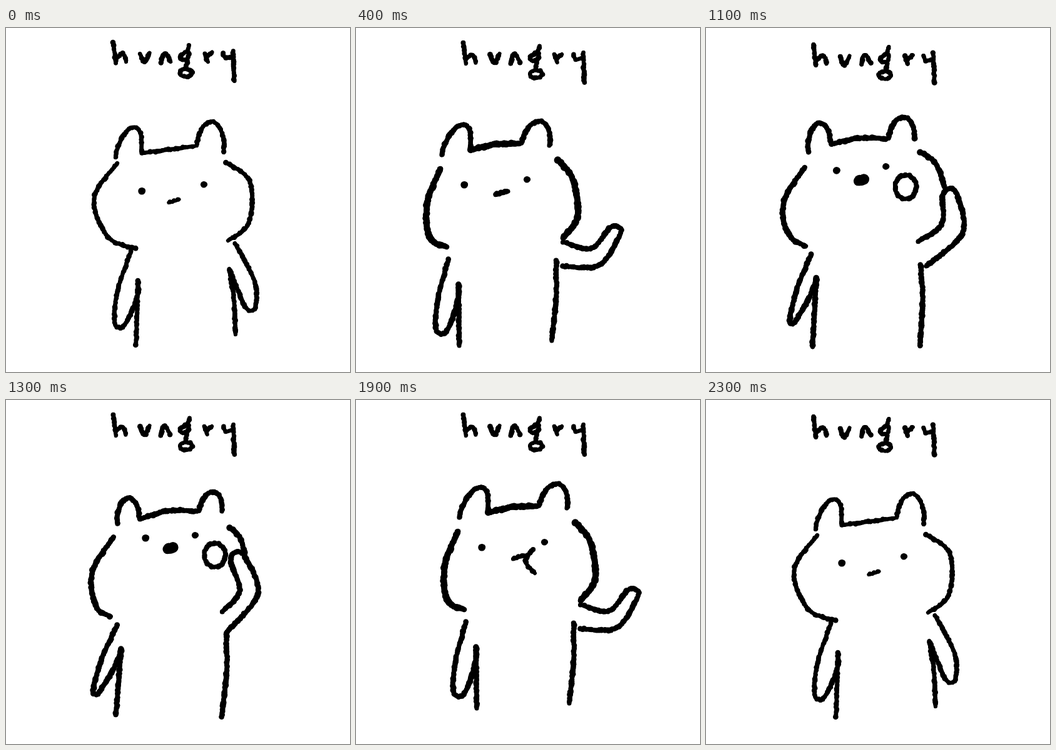
These frames come from a looping animation (550x550 px, 2.4 s). An HTML page with a canvas:

```html
<!DOCTYPE html>
<html lang="en">
<head>
<meta charset="utf-8">
<title>hungry</title>
<style>
html, body { margin: 0; width: 100%; height: 100%; overflow: hidden; background: #fff; }
canvas { display: block; width: 550px; height: 550px; }
</style>
</head>
<body>
<canvas id="stage" width="550" height="550" role="img" aria-label="hungry"></canvas>
<script>
const ctx = document.getElementById('stage').getContext('2d');
const STEP = 100, COUNT = 24, SAMPLES = 60;

const lerp = (a, b, u) => a + (b - a) * u;
const mix = (p, q, u) => p.map((v, i) => lerp(v, q[i], u));
const add = (p, q, k = 1) => [p[0] + q[0] * k, p[1] + q[1] * k];
const sub = (p, q) => add(p, q, -1);
const dist = (p, q) => Math.hypot(p[0] - q[0], p[1] - q[1]);
const unit = v => { const n = Math.hypot(...v); return [v[0] / n, v[1] / n]; };
const turn = v => [-v[1], v[0]];
const parse = s => s.split(' ').map(p => p.split(',').map(Number));

function random(seed) {
  let s = seed * 7919 + 17;
  return () => (s = (s * 16807 + 11) % 2147483647) / 2147483647;
}

// Evenly spaced points along a polyline
function even(fine) {
  const len = [0];
  for (let i = 1; i < fine.length; i++) len.push(len[i - 1] + dist(fine[i], fine[i - 1]));
  const total = len[len.length - 1];
  let i = 1;
  return Array.from({ length: SAMPLES }, (_, k) => {
    const at = total * k / (SAMPLES - 1);
    while (i < len.length - 1 && len[i] < at) i++;
    return mix(fine[i - 1], fine[i], (at - len[i - 1]) / (len[i] - len[i - 1] || 1));
  });
}

// Catmull-Rom curve through a few points
function curve(p) {
  const fine = [], last = p.length - 1;
  for (let i = 0; i < last; i++) {
    const a = p[Math.max(0, i - 1)], b = p[i], c = p[i + 1], d = p[Math.min(last, i + 2)];
    for (let k = 0; k < 24; k++) {
      const t = k / 24;
      fine.push([0, 1].map(j => b[j] + 0.5 * t * (c[j] - a[j] + t * (2 * a[j] - 5 * b[j] + 4 * c[j] - d[j]
        + t * (3 * (b[j] - c[j]) + d[j] - a[j])))));
    }
  }
  fine.push(p[last]);
  return even(fine);
}

// Half ellipse from a to b over the given peak
function arch([a, peak, b]) {
  const rise = sub(peak, mix(a, b, 0.5));
  return even(Array.from({ length: 41 }, (_, i) => {
    const w = Math.PI * i / 40;
    return add(mix(a, b, (1 - Math.cos(w)) / 2), rise, Math.sin(w));
  }));
}

function ring(x, y, rx, ry) {
  return even(Array.from({ length: 41 }, (_, i) => {
    const w = Math.PI * i / 20;
    return [x + rx * Math.cos(w), y + ry * Math.sin(w)];
  }));
}

// Arm outline: shoulder, round tip, armpit; the elbow is halfway unless given
function limb([a, tip, b, elbow], r) {
  const root = mix(a, b, 0.5), mid = elbow || mix(root, tip, 0.45);
  let across = turn(unit(sub(tip, root)));
  const d = sub(a, b), side = Math.sign(d[0] * across[0] + d[1] * across[1]);
  const half = side * (dist(a, b) / 2 + r) / 2;
  const axis = unit(sub(tip, mid)), cap = add(tip, axis, -r), wide = turn(axis);
  return curve([a, add(mid, across, half), add(cap, wide, side * r), tip,
    add(cap, wide, -side * r), add(mid, across, -half), b]);
}

// Crayon line: overlapping dabs with an uneven edge
function brush(pts, width, seed) {
  const rnd = random(seed), jit = n => (rnd() - 0.5) * n;
  ctx.lineWidth = width * 0.8;
  ctx.beginPath();
  pts.forEach(p => ctx.lineTo(p[0], p[1]));
  ctx.stroke();
  let left = 0;
  for (let i = 1; i < pts.length; i++) {
    const d = dist(pts[i - 1], pts[i]);
    for (; left <= d; left += 3) {
      const [x, y] = mix(pts[i - 1], pts[i], left / (d || 1));
      ctx.beginPath();
      ctx.arc(x + jit(1.6), y + jit(1.6), width * 0.48 + jit(1.6), 0, 7);
      ctx.fill();
    }
    left -= d;
  }
}

const line = (s, width) => ({ pts: curve(parse(s)), width });
const shift = (l, dx, dy) => ({ pts: l.pts.map(p => add(p, [dx, dy])), width: l.width });

// Crown joins the ears; the left leg hangs from the left armpit
function pose(o) {
  const earL = parse(o.earL), earR = parse(o.earR), armL = parse(o.armL);
  const from = add(earL[2], [2, 3]), to = add(earR[0], [-4, 1]);
  const crown = [from, add(mix(from, to, 0.5), [0, -o.rise]), to];
  const thin = pts => ({ pts, width: o.thin }), thick = pts => ({ pts, width: o.thick });
  return {
    lines: [
      thin(arch(earL)), thin(arch(earR)), thick(curve(crown)),
      thick(curve(parse(o.cheekL))), thick(curve(parse(o.cheekR))),
      thin(limb(armL, o.tipL)), thin(limb(parse(o.armR), o.tipR)),
      thin(curve([armL[2], parse(o.foot)[0]])), thin(curve(parse(o.leg)))
    ],
    eyes: parse(o.eyes), face: o.face
  };
}

const stand = pose({
  thin: 7.8, thick: 7.8, rise: 0, tipL: 9, tipR: 9,
  earL: '175,207 202,159 216,197', earR: '305,188 331,150 348,199',
  cheekL: '178,216 141,272 163,334 208,353', cheekR: '352,215 390,246 388,312 355,340',
  armL: '200,357 180,479 211,404', foot: '208,507',
  armR: '366,344 393,452 357,385 383,409', leg: '357,387 364,430 367,490',
  eyes: '218,260 317,250', face: [line('260,279 277,274', 6.5)]
});

const reach = pose({
  thin: 8.8, thick: 10.8, rise: 4, tipL: 10, tipR: 10,
  earL: '137,203 168,155 182,192', earR: '265,184 294,149 309,188',
  cheekL: '135,225 114,280 118,335 145,350', cheekR: '323,211 347,243 354,302 331,336',
  armL: '148,370 135,489 164,410', foot: '165,508',
  armR: '331,342 420,318 330,381 382,366', leg: '320,372 320,430 313,500',
  eyes: '174,250 274,242', face: [line('223,266 243,261', 8.8)]
});

const lift = pose({
  thin: 9, thick: 9.4, rise: 3, tipL: 4, tipR: 10,
  earL: '142,200 155,146 179,176', earR: '267,175 293,136 315,177',
  cheekL: '137,228 105,280 110,328 148,353', cheekR: '320,190 350,205 370,235 380,265',
  armL: '154,365 128,475 165,402', foot: '162,520',
  armR: '330,345 421,277 352,394 407,341', leg: '329,385 336,430 338,511',
  eyes: '188,238 266,229',
  face: [line('222,255 240,250', 7.5), line('380,266 399,266 404,287 381,310 330,342', 8.5)]
});

const eat = pose({
  thin: 9, thick: 9.4, rise: 7, tipL: 5, tipR: 12,
  earL: '178,198 193,157 213,187', earR: '309,177 331,147 345,178',
  cheekL: '172,219 138,275 144,330 167,346', cheekR: '358,204 374,220 382,248',
  armL: '178,360 142,470 184,398', foot: '176,503',
  armR: '346,338 367,243 352,372 388,308', leg: '352,375 353,430 345,507',
  eyes: '224,220 303,216',
  face: [line('258,238 268,236', 17), { pts: ring(334, 248, 17, 19), width: 8 }]
});

const wave = pose({
  thin: 8.6, thick: 9.2, rise: 1, tipL: 5, tipR: 9,
  earL: '186,197 203,161 222,188', earR: '318,176 341,154 350,187',
  cheekL: '178,220 153,270 160,310 180,329', cheekR: '358,200 384,234 379,286 345,322',
  armL: '178,347 155,485 182,398', foot: '181,507',
  armR: '343,322 427,242 344,360 400,312', leg: '344,372 349,440 348,507',
  eyes: '231,224 305,207', face: [line('262,247 280,243', 11.5)]
});

const move = (p, dx, dy) => ({
  lines: p.lines.map(l => shift(l, dx, dy)),
  eyes: p.eyes.map(e => add(e, [dx, dy])),
  face: p.face.map(l => shift(l, dx, dy))
});

const chew = move(reach, 28, -15);
chew.face = [line('251,254 263,250 275,249', 7.5), line('283,239 271,258 286,277', 7.5)];

// Lines glide; the face keeps its drawing and follows the eyes
function blend(a, b, u) {
  const eyes = a.eyes.map((e, i) => mix(e, b.eyes[i], u));
  const near = u < 0.5 ? a : b;
  const [dx, dy] = sub(mix(...eyes, 0.5), mix(...near.eyes, 0.5));
  return {
    lines: a.lines.map((l, k) => ({
      pts: l.pts.map((p, i) => mix(p, b.lines[k].pts[i], u)),
      width: lerp(l.width, b.lines[k].width, u)
    })),
    eyes, face: near.face.map(l => shift(l, dx, dy))
  };
}

const swing = move(blend(wave, chew, 0.49), 0, 14);
swing.lines[6].pts = limb(parse('352,334 480,270 352,376 430,330'), 9);

const keys = [[0, stand], [4, reach], [8, lift], [13, eat], [17, wave], [18, swing], [19, chew], [23, stand]];

function poseAt(n) {
  const i = keys.findIndex(k => k[0] > n), last = keys.length - 1;
  if (i < 0) return keys[last][1];
  const [from, a] = keys[i - 1], [to, b] = keys[i];
  return blend(a, b, (n - from) / (to - from));
}

const word = [
  '172,24 174,42 176,58', '177,49 185,42 190,46 192,55', '214,44 219,56 223,55 229,42',
  '248,56 251,44 256,42 263,55', '293,29 290,39', '287,41 279,48 284,53 292,50 293,41',
  '289,54 287,65', '317,43 322,56', '322,48 330,41', '348,42 352,50 363,48', '363,39 365,87'
].map(s => line(s, 7.6)).concat({ pts: ring(287, 74, 10, 6), width: 7.2 });

// The word is redrawn by hand three times in turn
function write(v) {
  const rnd = random(v + 5);
  word.forEach((l, i) => {
    const s = shift(l, rnd() * 2 - 1, rnd() * 2 - 1 + (v - 1) * 1.5);
    brush(s.pts, s.width, i + 1 + v * 20);
  });
}

function draw(n) {
  ctx.fillStyle = '#fff';
  ctx.fillRect(0, 0, 550, 550);
  ctx.fillStyle = ctx.strokeStyle = '#000';
  ctx.lineCap = ctx.lineJoin = 'round';
  write(n % 3);
  const p = poseAt(n);
  p.lines.concat(p.face).forEach((l, i) => brush(l.pts, l.width, i + 80));
  p.eyes.forEach(([x, y], i) => brush([[x - 0.8, y], [x + 0.8, y]], 10.8, i + 120));
}

let shown = -1;
const start = performance.now();
function tick() {
  const n = Math.floor((performance.now() - start) / STEP) % COUNT;
  if (n !== shown) draw(shown = n);
  requestAnimationFrame(tick);
}
tick();
</script>
</body>
</html>
```
